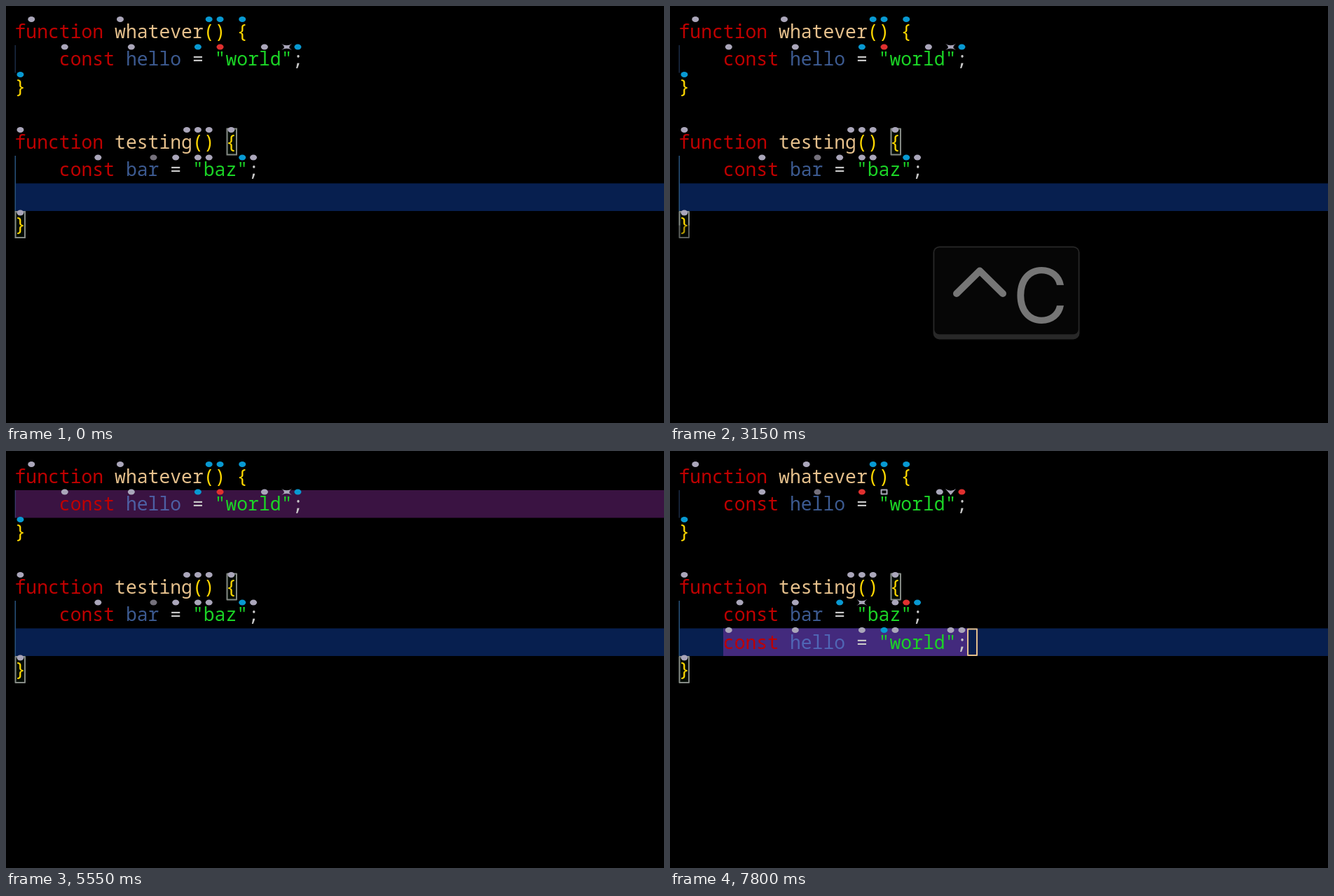
Recreate the animation shown at these times as an HTML page with a canvas. Size 939x596 px, loop 8000 ms.

```html
<!DOCTYPE html>
<html lang="en">
<head>
<meta charset="utf-8">
<title>Copying a line by keyboard</title>
<style>
html, body { margin: 0; width: 100%; height: 100%; overflow: hidden; background: #000; }
canvas { display: block; }
</style>
</head>
<body>
<canvas id="stage" width="939" height="596"></canvas>
<script>
const g = document.getElementById('stage').getContext('2d');
const LOOP = 8000, LEFT = 12.5, COL = 15.84, ROW = 39.5;
const colX = c => LEFT + c * COL;
const rowY = r => 16.3 + r * ROW;

const RED = '#c00000', TAN = '#e5c08c', GOLD = '#ffd700', GREEN = '#1bd426', PALE = '#c8c8c8';
const NAME = 'rgba(86,128,205,.7)';
const HAT = { g: '#aaa6ba', b: '#0899d2', r: '#e0302f', d: '#75717c' };

// Each token: column, text, colour
const fn = name => [[0, 'function', RED], [9, name, TAN],
  [9 + name.length, '()', GOLD], [12 + name.length, '{', GOLD]];
const decl = (name, value) => [[4, 'const', RED], [10, name, NAME], [11 + name.length, '=', PALE],
  [13 + name.length, value, GREEN], [13 + name.length + value.length, ';', PALE]];
const hello = decl('hello', '"world"');
const close = [[0, '}', GOLD]];
const code = [fn('whatever'), hello, close, [], fn('testing'), decl('bar', '"baz"'), [], close];

// Hats per row: column plus colour or shape (x star, v chevron, s square)
const hatsBefore = ['1g 9g 17b 18b 20b', '4g 10g 16b 18r 22g 24x 25b', '0b', '',
  '0g 15g 16g 17g 19g', '7g 12d 14g 16g 17g 20b 21g', '', '0g'];
const hatsAfter = [...hatsBefore];
hatsAfter[0] = '1g 11g 17b 18b 20b';
hatsAfter[1] = '7g 12d 16r 18s 23g 24v 25r';
hatsAfter[5] = '5g 10g 14b 16x 19g 20r 21b';
hatsAfter[6] = '4g 10g 16g 18b 19g 24g 25g';

// Steps of [start, value]
const cursor = [[0, ''], [600, 'bar'], [1050, ''], [1500, 'bar'], [2100, ''], [2400, 'box'], [2850, ''],
  [3300, 'box'], [3750, 'line'], [4050, 'box'], [4500, ''], [5100, 'box'], [5550, ''],
  [5850, 'box'], [6450, ''], [6900, 'box'], [7350, ''], [7800, 'box']];
const keys = [[0, ''], [2400, '^C'], [3300, ''], [3750, 'M'], [4050, 'MH'], [4500, '⇧L'],
  [5550, ''], [5700, 'U'], [6450, '']];
const shown = [[0, 0], [2400, .63], [2550, .85], [2700, .95], [2850, 1], [3150, .5], [3300, 0],
  [3750, .45], [3900, .78], [4050, 1], [4500, .7], [4650, 1], [5400, .5], [5550, 0],
  [5700, .5], [5850, .9], [6000, 1], [6300, .5], [6450, 0]];
const at = (steps, t) => steps.findLast(s => s[0] <= t)[1];

function fill(color, x, y, w, h) {
  g.fillStyle = color;
  g.fillRect(x, y, w, h);
}

function box(color, x, y, w, h) {
  g.strokeStyle = color;
  g.lineWidth = 2;
  g.strokeRect(x + 1, y + 1, w - 2, h - 2);
}

function drawHat(kind, x, y) {
  g.save();
  g.translate(x, y);
  g.fillStyle = HAT[kind] || HAT.g;
  g.beginPath();
  if (kind === 's') {
    box(HAT.g, -5, -4, 10, 8);
  } else if (kind === 'x') {
    g.moveTo(-7.5, -4.5);
    g.quadraticCurveTo(0, 0, 7.5, -4.5);
    g.quadraticCurveTo(0, 0, 7.5, 4.5);
    g.quadraticCurveTo(0, 0, -7.5, 4.5);
    g.quadraticCurveTo(0, 0, -7.5, -4.5);
  } else if (kind === 'v') {
    g.moveTo(-7.5, -4.5);
    g.quadraticCurveTo(0, 1, 7.5, -4.5);
    g.lineTo(0, 4.5);
  } else {
    g.ellipse(0, 0, 5, 4, 0, 0, 7);
  }
  g.fill();
  g.restore();
}

function drawCap(x, w) {
  g.fillStyle = '#505050';
  g.beginPath();
  g.roundRect(x, 343.5, w, 133, 9);
  g.fill();
  g.fillStyle = '#0c0c0c';
  g.beginPath();
  g.roundRect(x + 1.8, 345.3, w - 3.6, 124, 7);
  g.fill();
}

function drawLetter(char, left) {
  g.font = '108px Inter, Roboto, sans-serif';
  g.fillStyle = '#eee';
  g.fillText(char, left + g.measureText(char).actualBoundingBoxLeft, 452.5);
}

function drawSign(path, width) {
  g.strokeStyle = '#eee';
  g.lineWidth = width;
  g.lineJoin = g.lineCap = 'round';
  g.stroke(new Path2D(path));
}

const drawKey = {
  '^C'() {
    drawCap(375.5, 209);
    drawSign('M409 411L442 378.5L475 411', 10);
    drawLetter('C', 495);
  },
  M() {
    drawCap(416.5, 127.5);
    drawLetter('M', 441);
  },
  MH() {
    drawCap(353, 127.5);
    drawLetter('M', 377.5);
    drawCap(495, 112);
    drawLetter('H', 519.5);
  },
  '⇧L'() {
    drawCap(378.5, 203);
    drawSign('M450.5 378L491.5 418.5H468.5V445Q468.5 448 465.5 448H435.5Q432.5 448 432.5 445V418.5H409.5Z', 9);
    drawLetter('L', 513);
  },
  U() {
    drawCap(423.5, 113);
    drawLetter('U', 448);
  }
};

function drawCursor(shape, col) {
  const x = Math.round(colX(col));
  if (shape === 'bar') fill(TAN, x, 253.5, 4, 39.5);
  if (shape === 'line') fill(TAN, x, 289, 15.5, 4);
  if (shape === 'box') box(TAN, x, 253.5, 15, 39.5);
}

function draw(t) {
  const copied = t >= 5850;
  fill('#000', 0, 0, 939, 596);

  // Row backgrounds
  fill('#071f4f', 13, 253.5, 926, 39.5);
  if (t >= 4050 && t < 4500) fill('#3a1342', colX(10), 56, 5 * COL, 39.5);
  if (t >= 4500 && t < 6150) fill('#3a1342', 13, 56, 926, 39.5);
  if (copied) fill(t < 6150 ? '#4f17a8' : '#432a7d', 76, 253.5, 349.5, 39.5);

  // Indent guides and matching brackets
  fill('rgba(70,110,180,.38)', 12.5, 56, 1.5, 39.5);
  fill('#28527c', 12.5, 214, 1.5, 79);
  for (const [x, y] of [[314.5, 174.5], [12.5, 293]]) {
    fill('#020c04', x, y, 15.5, 39);
    box('#858a85', x, y, 15.5, 39);
  }

  g.font = '26.4px "Noto Sans Mono", "DejaVu Sans Mono", monospace';
  code.forEach((line, row) => {
    if (row === 6 && copied) line = hello;
    for (const [col, text, color] of line) {
      g.fillStyle = color;
      g.fillText(text, colX(col), rowY(row) + 29.5);
    }
  });

  (copied ? hatsAfter : hatsBefore).forEach((row, r) => {
    for (const hat of row.split(' ').filter(Boolean)) {
      drawHat(hat.slice(-1), colX(parseInt(hat) + .5), rowY(r) + 2.7);
    }
  });

  drawCursor(at(cursor, t), copied ? 26 : 4);

  // Key display, faded by a black veil
  const key = at(keys, t), alpha = at(shown, t);
  if (key) {
    drawKey[key]();
    fill(`rgba(0,0,0,${1 - alpha})`, 340, 340, 280, 140);
    fill(`rgba(0,0,0,${.6 * alpha})`, 12, 313.5, 20, 20);
  }
}

const start = performance.now();
function tick() {
  draw((performance.now() - start) % LOOP);
  requestAnimationFrame(tick);
}
tick();
</script>
</body>
</html>
```
